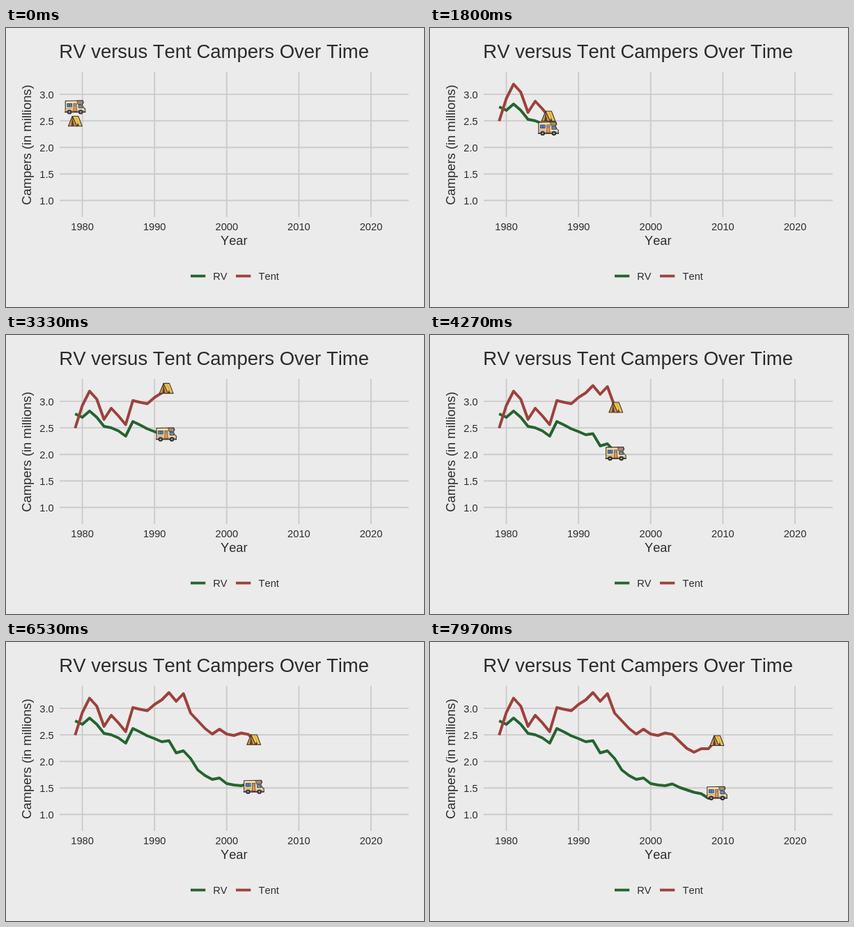
An HTML page with a canvas that plays this animation: 600 by 400 pixels, repeating every 8000 ms.

```html
<!DOCTYPE html>
<html lang="en">
<head>
<meta charset="utf-8">
<title>RV versus Tent Campers Over Time</title>
<style>
html, body { margin: 0; width: 100%; height: 100%; overflow: hidden; background: #ebebeb; }
canvas { display: block; width: 600px; height: 400px; }
</style>
</head>
<body>
<canvas id="stage" width="600" height="400"></canvas>
<script>
const ctx = document.getElementById('stage').getContext('2d');

const LOOP = 8000;
const STEP = 100 / 3;          // ms per drawn step
const STEPS_PER_YEAR = 7.92;
const GREEN = '#25642f', RED = '#9d413b', INK = '#2c2c2c', GRID = '#cbcbcb', OUTLINE = '#3a3433';

// Heights on the stage, one per year from 1979
const rv = [113, 118, 109, 118, 131, 133, 137.5, 145, 124, 129, 134.5, 138.5, 143, 141.5, 159, 156,
  167, 183.5, 191.5, 197, 195, 203, 205, 206, 203.5, 208.5, 212, 215.5, 217.5, 224, 217, 213];
const tent = [133.5, 101, 80.5, 92, 121, 105, 116, 128.5, 94, 96.5, 98.5, 89.5, 83, 72.5, 85, 74,
  102, 113, 124, 132, 125, 132, 134, 130.5, 132.5, 142.5, 152.5, 158, 153, 153, 141.5, 140];

const yearX = year => 109.6 + (year - 1980) * 10.36;
const valueY = value => 95.1 + (3 - value) * 76.1;

function headOf(series, pos) {
  const i = Math.floor(pos);
  return { x: yearX(1979 + pos), y: series[i] + (series[i + 1] - series[i]) * (pos - i) };
}

function stroke(points, color, width) {
  ctx.strokeStyle = color;
  ctx.lineWidth = width;
  ctx.beginPath();
  points.forEach(([x, y]) => ctx.lineTo(x, y));
  ctx.stroke();
}

function poly(points, fill, line, width = 1) {
  ctx.beginPath();
  points.forEach(([x, y]) => ctx.lineTo(x, y));
  ctx.closePath();
  ctx.fillStyle = fill;
  ctx.fill();
  if (line) {
    ctx.strokeStyle = line;
    ctx.lineWidth = width;
    ctx.stroke();
  }
}

function rect(x, y, w, h, fill) {
  ctx.fillStyle = fill;
  ctx.fillRect(x, y, w, h);
}

function disc(x, y, r, fill) {
  ctx.fillStyle = fill;
  ctx.beginPath();
  ctx.arc(x, y, r, 0, Math.PI * 2);
  ctx.fill();
}

function text(str, x, y, size, align = 'center') {
  ctx.font = size + 'px "Liberation Sans", Arial, sans-serif';
  ctx.fontKerning = 'none';
  ctx.textAlign = align;
  ctx.fillStyle = INK;
  ctx.fillText(str, x, y);
}

function drawChart() {
  rect(0, 0, 600, 400, '#ebebeb');
  for (let v = 1; v <= 3; v += 0.5) {
    stroke([[77, valueY(v)], [578, valueY(v)]], GRID, 1.9);
    text(v.toFixed(1), 68.6, valueY(v) + 5.6, 14.65, 'right');
  }
  for (let year = 1980; year <= 2020; year += 10) {
    stroke([[yearX(year), 63], [yearX(year), 271]], GRID, 1.9);
    text(year, yearX(year), 290, 14.65);
  }
  text('RV versus Tent Campers Over Time', 76.3, 43, 27.5, 'left');
  text('Year', 327.3, 311, 18.3);
  ctx.save();
  ctx.translate(36, 167.5);
  ctx.rotate(-Math.PI / 2);
  text('Campers (in millions)', 0, 0, 18.35);
  ctx.restore();

  stroke([[265, 355.6], [286.3, 355.6]], GREEN, 3.8);
  stroke([[330, 355.6], [351.3, 355.6]], RED, 3.8);
  text('RV', 297.3, 361, 14.65, 'left');
  text('Tent', 362.6, 361, 14.65, 'left');
}

function drawSeries(series, pos, color) {
  const head = headOf(series, pos);
  const points = series.slice(0, Math.floor(pos) + 1).map((y, i) => [yearX(1979 + i), y]);
  points.push([head.x, head.y]);
  stroke(points, color, 4);
}

function at({ x, y }, draw) {
  ctx.save();
  ctx.translate(x, y);
  draw();
  ctx.restore();
}

function drawTent() {
  poly([[-4, -7], [4.5, -7], [10, 7.2], [2, 7.2]], '#f3c552', OUTLINE, 1.1);
  poly([[-4, -7], [2.6, 7.2], [-9.8, 7.2]], '#dc9845', OUTLINE, 1.1);
  poly([[-3.8, -3], [-1, 7], [-6, 7]], '#6f4932');
  stroke([[-4, -7], [-4, 7]], OUTLINE, 0.9);
  stroke([[1, -6], [6.2, 6.8]], '#c98f36', 0.8);
  poly([[3.4, 2.5], [5.8, 7], [2.6, 7]], OUTLINE);
}

function drawRv() {
  // Body with the bunk over the cab
  poly([[-14, -8.5], [11, -9], [12, -6], [10, -3], [12.5, 1.5], [14.5, 3], [14.5, 7.5], [-14, 7.5]],
    '#f3dcab', OUTLINE, 1.1);
  poly([[2.5, -8.8], [10.5, -8.8], [11.3, -6], [9, -3.6], [4, -3.6]], '#a38c70', OUTLINE, 0.8);
  rect(-14, 4.6, 28.3, 2.8, '#b9a68a');
  rect(-11.8, -5, 7.6, 5.4, OUTLINE);
  rect(-11, -4.3, 2.7, 4, '#4a86d8');
  rect(-7.6, -4.3, 2.7, 4, '#4a86d8');
  rect(-2.6, -5.2, 5, 12, '#6d4230');
  rect(-1.9, -4.5, 3.6, 10.6, '#e0964a');
  rect(-1.2, -3.6, 2.2, 3, '#5d8fc9');
  poly([[5, -2.6], [9, -2.6], [11, 1.6], [5, 1.6]], '#5b93d8', OUTLINE, 0.8);
  rect(-13.5, 2, 10, 1.2, '#d19a52');
  rect(-15, 6.7, 30, 1.6, OUTLINE);
  for (const x of [-8.2, 8]) {
    disc(x, 7.4, 3.2, '#302e31');
    disc(x, 7.4, 1.3, '#aaa49c');
  }
}

function draw(now) {
  const time = now % LOOP;
  const pos = Math.min(239, Math.floor((time + 5) / STEP)) / STEPS_PER_YEAR;
  ctx.lineJoin = 'round';
  drawChart();
  drawSeries(rv, pos, GREEN);
  drawSeries(tent, pos, RED);
  at(headOf(tent, pos), drawTent);
  at(headOf(rv, pos), drawRv);
}

const start = performance.now();
function tick() {
  draw(performance.now() - start);
  requestAnimationFrame(tick);
}
tick();
</script>
</body>
</html>
```
